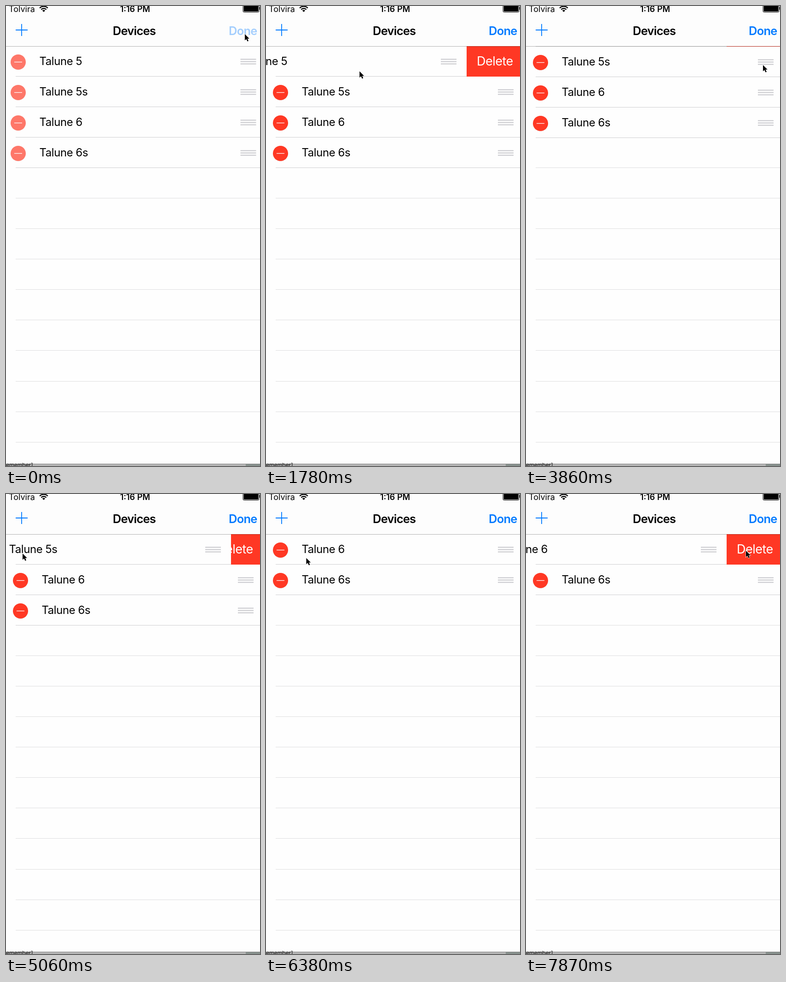
An HTML page that plays this animation: 552 by 997 pixels, repeating every 8000 ms.

```html
<!DOCTYPE html>
<html lang="en">
<head>
<meta charset="utf-8">
<title>Editable device list</title>
<style>
  html, body { margin: 0; width: 100%; height: 100%; overflow: hidden; background: #fefefe; }
  svg { display: block; width: 552px; height: 997px; font-family: Inter, Roboto, sans-serif; }
  .item { font-size: 24px; letter-spacing: -.45px; }
  .bar { font-size: 25.5px; font-weight: 600; letter-spacing: -.75px; }
  .status { font-size: 18px; }
  .button { font-size: 27px; letter-spacing: -.5px; fill: #fff; }
  .grip { stroke: #c7c7cc; stroke-width: 2; }
</style>
</head>
<body>
<svg viewBox="0 0 552 997">
  <rect width="552" height="997" fill="#fefefe"/>
  <g id="lines"></g>
  <g id="rows"></g>

  <rect width="552" height="87" fill="#fdfdfd"/>
  <rect y="87" width="552" height="1" opacity=".3"/>
  <text class="status" x="6" y="13">Tolvira</text>
  <g fill="none" stroke="#000" stroke-width="2.4">
    <path d="M73.2 4.4A12.4 12.4 0 0 1 90.8 4.4M76.4 7.6A8 8 0 0 1 87.6 7.6"/>
    <path d="M82 13L78.8 9.8A4.5 4.5 0 0 1 85.2 9.8Z" fill="#000" stroke="none"/>
  </g>
  <text class="status" x="280.5" y="13" text-anchor="middle" font-weight="600">1:16 PM</text>
  <rect x="515" y="-3" width="35" height="16.5" rx="2.5" fill="none" stroke="#000"/>
  <rect x="516.5" y="-2" width="32" height="14" rx="1"/>
  <rect x="551" y="2" width="1" height="6"/>
  <path d="M21 52H47M34 39V65" stroke="#007aff" stroke-width="1.8"/>
  <text class="bar" x="278.7" y="63" text-anchor="middle">Devices</text>
  <text class="bar" id="done" x="484" y="63" fill="#007aff">Done</text>

  <rect y="992" width="552" height="5" fill="#b5b5b5"/>
  <rect x="521" y="992" width="31" height="5" fill="#87918d"/>
  <rect y="992" width="552" height="1" fill="#858585"/>
  <text x="-4" y="999" font-size="12">remember]</text>

  <path id="cursor" d="M0 0V13.6L3.2 10.7L5.6 15.8L8 14.7L5.7 9.8H9.8Z"
        stroke="#fff" stroke-width="1.2" paint-order="stroke"/>
</svg>
<script>
const LOOP = 8000, STEP = 148.4, ROW = 66, TOP = 87;
const OPEN = 124, OPEN_MS = 425, CUT_MS = 280;

// when each row slides open and when it is removed
const rowPlan = [
  { name: 'Talune 5', open: 1230, cut: 3600 },
  { name: 'Talune 5s', open: 4940, cut: 5895 },
  { name: 'Talune 6', open: 7018 },
  { name: 'Talune 6s' }
];

// pointer trips from one resting place to the next, in steps, with a dip on the way
const home = { x: 519, y: 61 };
const trips = [
  { from: 0, to: 6, x: 20, y: 122, dip: 20 },
  { from: 11, to: 18, x: 515, y: 128, dip: 40 },
  { from: 26, to: 32, x: 36, y: 129, dip: 20 },
  { from: 35, to: 39, x: 490, y: 127, dip: 20 },
  { from: 40, to: 46, x: 30, y: 122, dip: 16 },
  { from: 49, to: 53, x: 478, y: 123, dip: 12 }
];

const $ = id => document.getElementById(id);
const clamp = v => Math.max(0, Math.min(1, v));
const smooth = p => p * p * (3 - 2 * p);
const easeOut = p => 1 - (1 - p) ** 3;
const move = (el, x, y = 0) => el.setAttribute('transform', `translate(${x} ${y})`);

let lines = '';
for (let k = 0; k < 13; k++) {
  lines += `<rect x="21" y="${Math.round(152 + 66.05 * k)}" width="531" height="1" fill="#dededf"/>`;
}
$('lines').innerHTML = lines;

// each row is drawn with its top edge at zero
$('rows').innerHTML = rowPlan.map(({ name }) => `<g>
  <rect width="552" height="66" fill="#fefefe"/>
  <g class="delete">
    <rect width="552" height="66" fill="#ff3824"/>
    <text class="button" x="458" y="42">Delete</text>
  </g>
  <g class="cell">
    <rect width="560" height="66" fill="#fefefe"/>
    <g class="minus">
      <circle cx="31.5" cy="35.2" r="16.5" opacity=".08"/>
      <circle cx="31.5" cy="34.5" r="16.5" fill="#ff3824"/>
      <path d="M23 34.5H40" stroke="#fff" stroke-width="1.3"/>
    </g>
    <text class="item" x="77.5" y="41">${name}</text>
    <path class="grip" d="M504 28.5H538M504 33.5H538M504 38.5H538"/>
  </g>
  <rect class="rule" x="21" y="65" width="531" height="1" fill="#cfcfd1"/>
</g>`).join('');

const rows = [...$('rows').children].map(el => {
  const part = name => el.querySelector('.' + name);
  return { el, cell: part('cell'), del: part('delete'), minus: part('minus'),
           label: part('item'), grip: part('grip'), rule: part('rule') };
});

function pointer(n) {
  let { x, y } = home;
  for (const trip of trips) {
    const p = clamp((n - trip.from) / (trip.to - trip.from)), e = easeOut(p);
    x += (trip.x - x) * e;
    y += (trip.y - y) * e + trip.dip * Math.sin(Math.PI * p);
  }
  return [x, y];
}

function draw(time) {
  const n = Math.floor((time + 3) / STEP), t = n * STEP;
  const entering = n === 0;
  let lift = 0;
  for (const { cut } of rowPlan) {
    if (cut) lift += ROW * smooth(clamp((t - cut) / CUT_MS));
  }

  rows.forEach((row, i) => {
    const { open } = rowPlan[i];
    const shift = open ? Math.round(OPEN * easeOut(clamp((t - open) / OPEN_MS))) : 0;
    move(row.el, 0, TOP + ROW * i - Math.round(lift));
    move(row.cell, -shift);
    row.del.style.display = shift ? '' : 'none';
    row.rule.setAttribute('width', Math.min(531, 539 - shift));
    row.minus.setAttribute('opacity', entering ? .68 : 1);
    move(row.minus, entering ? -5 : 0);
    move(row.label, entering ? -5 : 0);
    move(row.grip, entering ? 5.5 : 0);
  });

  $('done').setAttribute('opacity', entering ? .35 : 1);
  move($('cursor'), ...pointer(n));
}

const start = performance.now();
function tick() {
  draw((performance.now() - start) % LOOP);
  requestAnimationFrame(tick);
}
tick();
</script>
</body>
</html>
```
